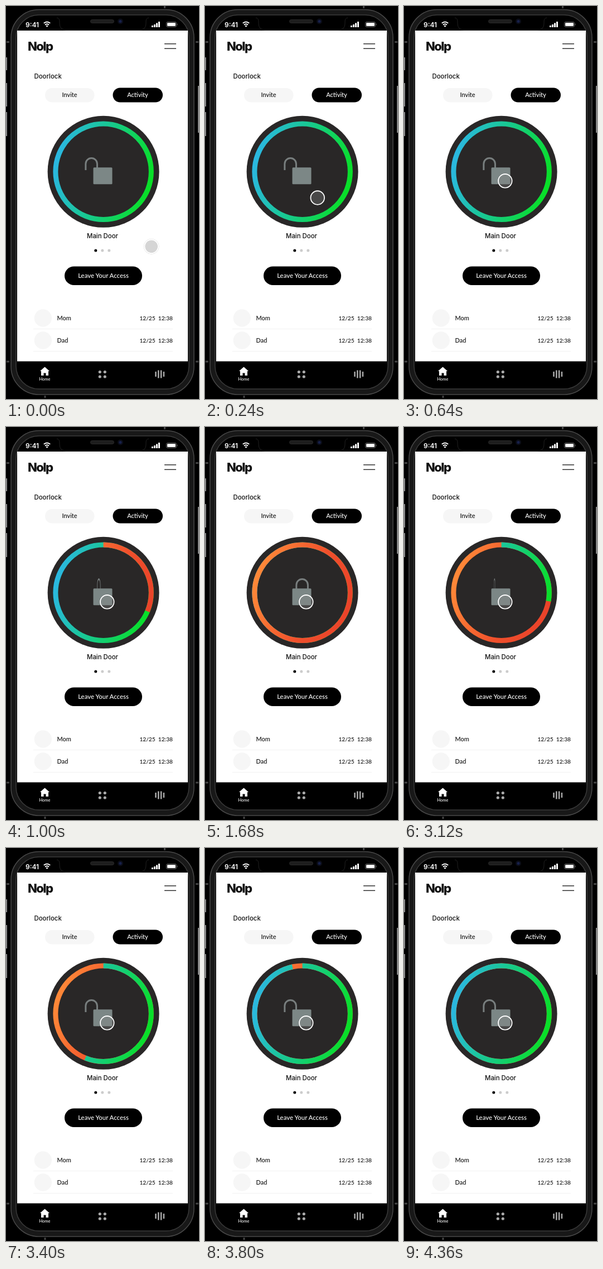
Animation, 346 px wide and 704 px high, one loop 4960 ms. Source, as an HTML page:

```html
<!DOCTYPE html>
<html lang="en">
<head>
<meta charset="utf-8">
<title>Door lock</title>
<style>
  html, body { margin: 0; width: 100%; height: 100%; overflow: hidden; background: #000; }
  svg { display: block; width: 346px; height: 704px; }
  text { font: 500 11px Lato, sans-serif; fill: #111; }
  .mid { text-anchor: middle; }
  .light { fill: #fff; }
  .title { font: 500 11.400px Inter, sans-serif; }
  .logo { font: 800 22px Inter, sans-serif; letter-spacing: -1.6px; }
  .clock { font: 600 12px Inter, sans-serif; }
  .date { font-size: 10.200px; text-anchor: end; }
</style>
</head>
<body>
<svg viewBox="0 0 346 704">
  <defs>
    <linearGradient id="green" gradientUnits="userSpaceOnUse" x1="88" y1="272" x2="262" y2="316">
      <stop offset="0" stop-color="#2bb7e2"/>
      <stop offset=".45" stop-color="#18c990"/>
      <stop offset="1" stop-color="#08e024"/>
    </linearGradient>
    <linearGradient id="orange" gradientUnits="userSpaceOnUse" x1="92" y1="268" x2="256" y2="326">
      <stop offset="0" stop-color="#ff8838"/>
      <stop offset=".6" stop-color="#f0502c"/>
      <stop offset="1" stop-color="#ea432a"/>
    </linearGradient>
  </defs>

  <!-- Phone body -->
  <rect width="346" height="704"/>
  <path d="M1 92v23M1 138v42M1 190v43M345 143v84" stroke="#b5b5b5" stroke-width="1.5"/>
  <path d="M284.500 0v4M70 698v4M1 64.500h5M1 637h5M340 64.500h5M340 637h5" stroke="#444" stroke-width="3"/>
  <rect x="9" y="6.500" width="328" height="689.500" rx="50" fill="#181818" stroke="#484848" stroke-width="1.5"/>
  <rect x="18" y="16" width="310" height="670" rx="41" fill="#000" stroke="#3a3a3a" stroke-width="1.5"/>

  <!-- Screen -->
  <rect x="20" y="44" width="306" height="592.500" fill="#fff"/>
  <path d="M91 21q5 1 5 6v4q0 12 12 12h131q12 0 12-12v-4q0-5 5-6" fill="#000" stroke="#202020"/>
  <rect x="151.500" y="24.500" width="42" height="6" rx="3" fill="#1d1d1d" stroke="#2a2a2a"/>
  <circle cx="205" cy="27.500" r="5" fill="#0b0d18"/>
  <circle cx="205" cy="27.500" r="2.500" fill="#17204a"/>

  <!-- Status bar -->
  <text x="35" y="37.500" class="clock light">9:41</text>
  <g fill="none" stroke="#fff" stroke-width="2">
    <path d="M67.800 30.800q5.700-4.600 11.400 0M70 33.600q3.500-2.800 7 0"/>
    <path d="M262.500 38v-3M266.500 38v-5M270.500 38v-7.500M274.500 38v-10" stroke-width="3"/>
  </g>
  <path d="M71.300 35.500q2.200-1.500 4.400 0l-2.200 2.300z" fill="#fff"/>
  <rect x="287.500" y="28.500" width="18" height="9" rx="2.500" fill="none" stroke="#666"/>
  <rect x="289" y="30" width="15" height="6" rx="1.300" fill="#fff"/>
  <path d="M307 31.500v3" stroke="#666"/>

  <!-- Page -->
  <text x="39" y="80" class="logo">Nolp</text>
  <path d="M284 67.700h21M284 76.200h21" stroke="#333" stroke-width="1.500"/>
  <text x="50.500" y="129.500" class="title">Doorlock</text>
  <rect x="70" y="147" width="88.500" height="25.500" rx="12.750" fill="#f6f6f6"/>
  <text x="114" y="163.300" class="mid">Invite</text>
  <rect x="191.500" y="146.500" width="89.500" height="26" rx="13"/>
  <text x="236" y="163.300" class="mid light">Activity</text>
  <text x="173" y="416" class="title mid">Main Door</text>
  <g fill="#ccc">
    <circle cx="160.800" cy="438" r="2.500" fill="#000"/>
    <circle cx="172.800" cy="438" r="2.500"/>
    <circle cx="184.800" cy="438" r="2.500"/>
  </g>
  <rect x="105" y="466.500" width="139" height="33.500" rx="16.750"/>
  <text x="174.500" y="487.300" class="mid light" style="font-size:11.400px">Leave Your Access</text>
  <g id="people"></g>

  <!-- Tab bar -->
  <path d="M69.500 646.500l8.500 7.500h-2v8h-4.500v-4.500h-4v4.500h-4.500v-8h-2z" fill="#fff"/>
  <text x="69.500" y="670.500" class="mid light" style="font-size:7.500px">Home</text>
  <g fill="#aaa">
    <circle cx="168.300" cy="655.500" r="2.600"/>
    <circle cx="177.300" cy="655.500" r="2.600"/>
    <circle cx="168.300" cy="664" r="2.600"/>
    <circle cx="177.300" cy="664" r="2.600"/>
  </g>
  <path d="M268.500 655v9M273.300 652.500v14M278.100 652.500v14M282.900 655v9" stroke="#aaa" stroke-width="2.500"/>

  <!-- Lock dial -->
  <circle cx="174.600" cy="296.800" r="100" fill="#292727"/>
  <g fill="none" stroke-width="9">
    <path id="ring" d="M174.600 211.100a85.700 85.700 0 1 1 0 171.400a85.700 85.700 0 1 1 0-171.400"/>
    <path id="sweep" d="M174.600 211.100a85.700 85.700 0 1 1 0 171.400a85.700 85.700 0 1 1 0-171.400" pathLength="360"/>
  </g>
  <path id="shackle" d="M.2 294v-11.200a10.300 10.300 0 0 1 20.600 0v11.200" fill="none" stroke="#787e7e" stroke-width="3"/>
  <rect x="156.500" y="289.300" width="34" height="30" rx="1.500" fill="#7c8786"/>

  <g id="cursor">
    <circle r="13.500" fill="none" stroke="#000" stroke-opacity=".12"/>
    <circle r="11.500" fill="#888" fill-opacity=".35"/>
    <circle r="12.300" fill="none" stroke="#fff" stroke-width="1.800"/>
  </g>
</svg>
<script>
const LOOP = 4960, SWEEP = 988, FLIP = 490;
const LOCK = 691, UNLOCK = 2846;
const el = id => document.getElementById(id);
const ring = el('ring'), sweep = el('sweep'), shackle = el('shackle'), cursor = el('cursor');
const progress = (t, start, length) => Math.min(1, Math.max(0, (t - start) / length));
const mix = (a, b, p) => a + (b - a) * p;

el('people').innerHTML = ['Mom', 'Dad'].map((name, i) => `
  <g transform="translate(0 ${i * 40})">
    <circle cx="66.300" cy="559" r="15.700" fill="#f6f6f6"/>
    <text x="91.500" y="563.300">${name}</text>
    <text x="299" y="563.100" class="date">12/25&nbsp; 12:38</text>
    <path d="M49 578.500h250" stroke="#f2f2f2"/>
  </g>`).join('');

function draw(t) {
  const opening = t >= UNLOCK;
  const start = opening ? UNLOCK : LOCK;
  const [from, to] = opening ? ['orange', 'green'] : ['green', 'orange'];
  ring.setAttribute('stroke', `url(#${from})`);
  sweep.setAttribute('stroke', `url(#${to})`);
  sweep.setAttribute('stroke-dasharray', `${360 * progress(t, start, SWEEP)} 720`);

  // The shackle mirrors about its hinge leg.
  const flip = mix(-1, 1, progress(t, start, FLIP)) * (opening ? -1 : 1);
  shackle.setAttribute('transform', `translate(163.650 0) scale(${flip} 1)`);

  const move = 1 - (1 - progress(t, 0, 560)) ** 2.42;
  cursor.setAttribute('transform', `translate(${mix(261, 181.300, move)} ${mix(431.300, 313.300, move)})`);
}

const origin = performance.now();
function tick() {
  draw((performance.now() - origin) % LOOP);
  requestAnimationFrame(tick);
}
tick();
</script>
</body>
</html>
```
